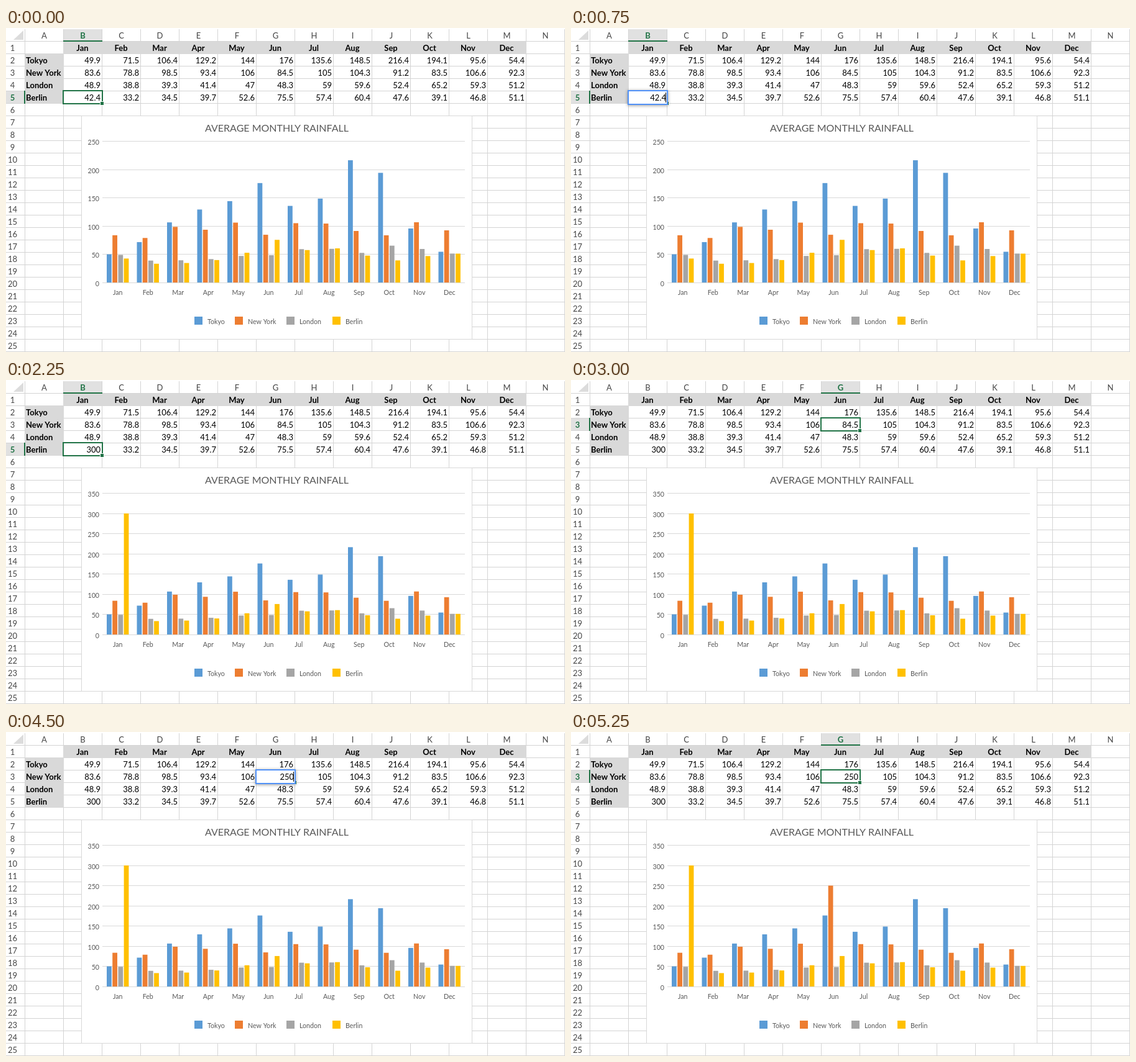
Write an HTML page with a canvas that moves like this. It is 899 by 522 pixels and loops after 6 s.

```html
<!DOCTYPE html>
<html lang="en">
<head>
<meta charset="utf-8">
<title>Monthly rainfall</title>
<style>
  html, body { margin: 0; width: 100%; height: 100%; overflow: hidden; background: #fff; }
  canvas { display: block; width: 899px; height: 522px; }
</style>
</head>
<body>
<canvas id="stage" width="899" height="522"></canvas>
<script>
const ctx = document.getElementById('stage').getContext('2d');
const STEP = 750;
const LEFT = 30, TOP = 21, COL = 62, ROW = 20;
const GRID = '#d4d4d4', GREEN = '#217346', FILL = '#d9d9d9', MUTED = '#595959';
const FONT = 'Lato, Carlito, sans-serif';

const months = 'Jan Feb Mar Apr May Jun Jul Aug Sep Oct Nov Dec'.split(' ');
const cities = [
  { name: 'Tokyo', color: '#5b9bd5', legendX: 303,
    rain: [49.9, 71.5, 106.4, 129.2, 144, 176, 135.6, 148.5, 216.4, 194.1, 95.6, 54.4] },
  { name: 'New York', color: '#ed7d31', legendX: 368,
    rain: [83.6, 78.8, 98.5, 93.4, 106, 84.5, 105, 104.3, 91.2, 83.5, 106.6, 92.3] },
  { name: 'London', color: '#a5a5a5', legendX: 451,
    rain: [48.9, 38.8, 39.3, 41.4, 47, 48.3, 59, 59.6, 52.4, 65.2, 59.3, 51.2] },
  { name: 'Berlin', color: '#ffc000', legendX: 525,
    rain: [42.4, 33.2, 34.5, 39.7, 52.6, 75.5, 57.4, 60.4, 47.6, 39.1, 46.8, 51.1] }
];

// Each edit: select the cell, open it, type the value, commit.
const edits = [
  { city: 3, month: 0, value: 300, keepHeaders: true },
  { city: 1, month: 5, value: 250, keepHeaders: false }
];

const colX = c => LEFT + c * COL;
const rowY = r => TOP + r * ROW;

function rect(x, y, w, h, color) {
  ctx.fillStyle = color;
  ctx.fillRect(x, y, w, h);
}

function text(str, x, y, size, color, align = 'left', weight = 400) {
  ctx.font = `${weight} ${size}px ${FONT}`;
  ctx.textAlign = align;
  ctx.fillStyle = color;
  ctx.fillText(str, x, y);
}

function drawGrid() {
  rect(0, 0, 899, 522, '#fff');
  for (let c = 0; c <= 14; c++) rect(colX(c), 2, 1, 520, GRID);
  for (let r = 0; r <= 25; r++) rect(0, rowY(r), 899, 1, GRID);
  rect(colX(1), TOP + 1, 12 * COL + 1, ROW, FILL);
  rect(LEFT + 1, rowY(1), COL, 4 * ROW + 1, FILL);

  ctx.fillStyle = '#dcdcdc';
  ctx.beginPath();
  ctx.moveTo(28, 4);
  ctx.lineTo(28, 19);
  ctx.lineTo(12, 19);
  ctx.fill();
}

function drawHeaders(col, row) {
  if (col !== null) {
    rect(colX(col) + 1, 2, COL - 1, 18, '#e1e1e1');
    rect(colX(col), 20, COL + 1, 2, GREEN);
    rect(0, rowY(row) + 1, 29, ROW - 1, '#e1e1e1');
    rect(29, rowY(row), 2, ROW + 1, GREEN);
  }
  const label = (str, x, y, active) =>
    text(str, x, y, 13, active ? GREEN : '#444', 'center', active ? 700 : 400);
  for (let c = 0; c < 14; c++)
    label(String.fromCharCode(65 + c), colX(c) + 31.5, 17, c === col);
  for (let r = 0; r < 25; r++)
    label(r + 1, 10.5, rowY(r) + 16, r === row);
}

function drawCells(table) {
  months.forEach((m, i) => text(m, colX(i + 1) + 31, rowY(0) + 16, 13, '#000', 'center', 700));
  cities.forEach((city, s) => {
    const y = rowY(s + 1) + 16;
    text(city.name, 32, y, 13, '#000', 'left', 700);
    table[s].forEach((v, i) => text(v, colX(i + 2) - 2, y, 13, '#000', 'right'));
  });
}

function drawChart(table) {
  rect(121, 141, 629, 361, FILL);
  rect(122, 142, 627, 359, '#fff');
  text('AVERAGE MONTHLY RAINFALL', 435.5, 167, 16, MUTED, 'center');

  const base = 410, height = 227.5;
  const max = Math.max(...table.flat()) > 250 ? 350 : 250;
  for (let v = 0; v <= max; v += 50) {
    const y = base - v / max * height;
    rect(155, Math.floor(y), 583, 1, FILL);
    text(v, 150, Math.round(y + 5.5), 10.67, MUTED, 'right');
  }
  months.forEach((m, i) => text(m, 179.75 + i * 48.5, 430, 10.67, MUTED, 'center'));

  cities.forEach((city, s) => {
    table[s].forEach((v, i) => {
      const h = v / max * height;
      rect(162 + i * 48.5 + s * 9.2, base - h, 7.8, h, city.color);
    });
    rect(city.legendX, 465, 13, 13, city.color);
    text(city.name, city.legendX + 21, 477, 10.67, MUTED);
  });
}

function drawSelection(x, y) {
  ctx.strokeStyle = GREEN;
  ctx.lineWidth = 2;
  ctx.strokeRect(x, y, COL + 1, ROW + 1);
  rect(x + COL - 3, y + ROW - 3, 7, 7, '#fff');
  rect(x + COL - 2, y + ROW - 2, 5, 5, GREEN);
}

function drawEditor(x, y, value) {
  drawSelection(x, y);
  ctx.save();
  ctx.shadowColor = 'rgba(0,0,0,.4)';
  ctx.shadowBlur = 5;
  ctx.shadowOffsetY = 1;
  rect(x - 1, y - 1, COL + 3, ROW + 4, '#5292f7');
  ctx.restore();
  rect(x + 1, y + 1, COL - 1, ROW, '#fff');
  rect(x + COL + 2, y + ROW, 1, 3, GREEN);
  text(value, x + COL - 1, y + 16, 13, '#000', 'right');
  rect(x + COL - 2, y + 3, 1, 16, '#000');
}

function draw(time) {
  const step = Math.floor(time / STEP) % 8;
  const current = Math.floor(step / 4), phase = step % 4;
  const edit = edits[current];
  const table = cities.map(c => c.rain.slice());
  edits.forEach((e, i) => {
    if (i < current || (i === current && phase === 3)) table[e.city][e.month] = e.value;
  });

  const col = edit.month + 1, row = edit.city + 1;
  const editing = phase === 1 || phase === 2;
  const marked = !editing || edit.keepHeaders;

  drawGrid();
  drawHeaders(marked ? col : null, marked ? row : null);
  drawCells(table);
  drawChart(table);
  const x = colX(col), y = rowY(row);
  if (editing) drawEditor(x, y, phase === 1 ? table[edit.city][edit.month] : edit.value);
  else drawSelection(x, y);
}

const start = performance.now();
function tick() {
  draw(performance.now() - start);
  requestAnimationFrame(tick);
}
tick();
</script>
</body>
</html>
```
